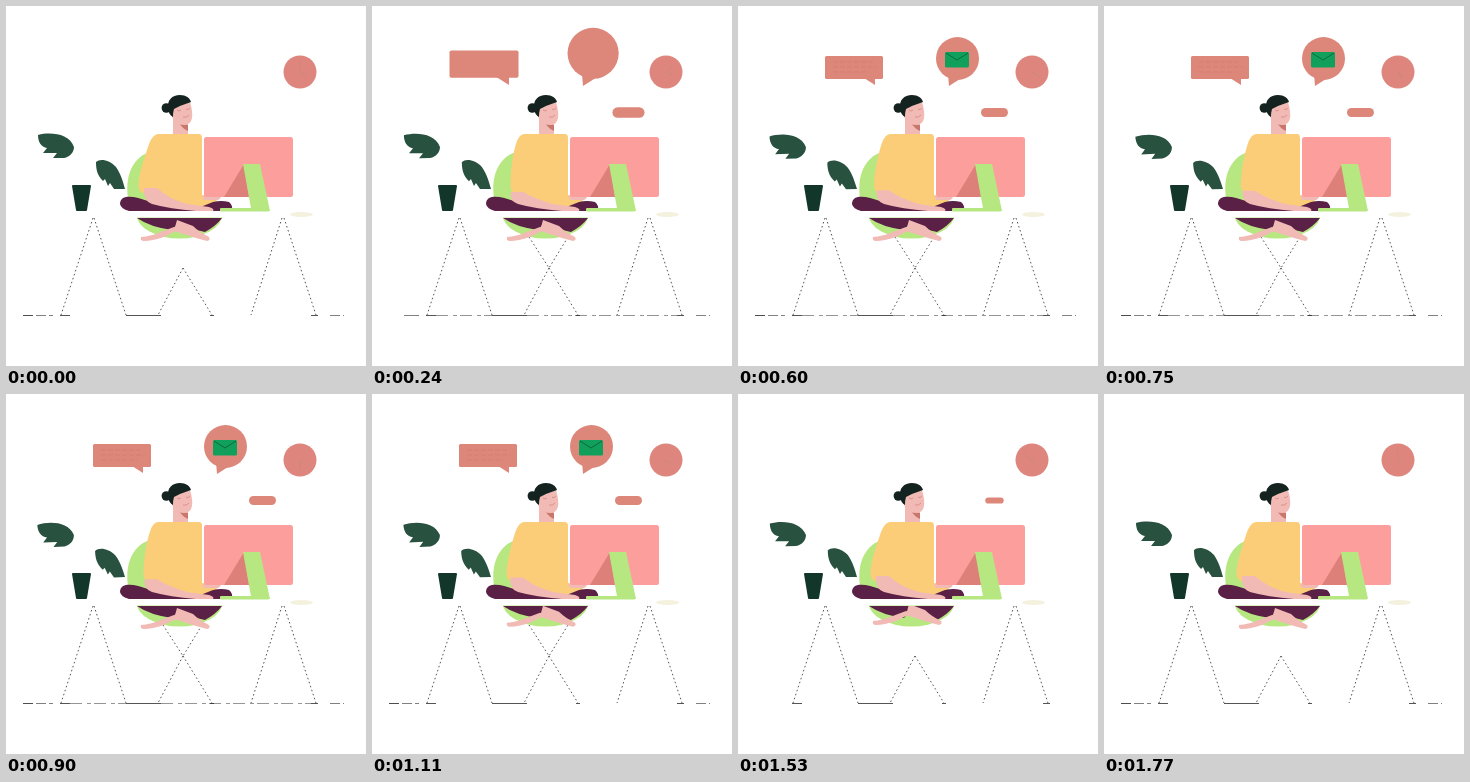
Write an HTML page with a canvas that moves like this. It is 360 px wide and 360 px high and loops after 1800 ms.

```html
<!DOCTYPE html>
<html lang="en">
<head>
<meta charset="utf-8">
<title>Working from home</title>
<style>
html, body { margin: 0; width: 100%; height: 100%; overflow: hidden; background: #fff; }
canvas { display: block; width: 360px; height: 360px; }
</style>
</head>
<body>
<canvas id="stage" width="360" height="360"></canvas>
<script>
const LOOP = 1800, STEP = 30;
const canvas = document.getElementById('stage');
const ctx = canvas.getContext('2d');
const dpr = window.devicePixelRatio || 1;
canvas.width = canvas.height = 360 * dpr;

const C = {
  bubble: '#dd877b', clock: '#de857e', screen: '#fc9f9c', shade: '#dd8079', lime: '#b7e781',
  shirt: '#fbcd78', skin: '#f2bab4', hair: '#14231f', legs: '#5a2045',
  leaf: '#29513f', pot: '#12372a', line: '#2a2a2a', mouse: '#f4f1df', mail: '#10a05c'
};

const clamp = x => Math.min(1, Math.max(0, x));
const ease = x => x * x * (3 - 2 * x);
const span = (t, a, b) => ease(clamp((t - a) / (b - a)));

// Eased interpolation through [time, value] pairs
function track(t, keys) {
  for (let i = 1; i < keys.length; i++) {
    const [a, u] = keys[i - 1], [b, v] = keys[i];
    if (t <= b) return u + (v - u) * span(t, a, b);
  }
  return keys[keys.length - 1][1];
}

function fill(d, color) {
  ctx.fillStyle = color;
  ctx.fill(new Path2D(d));
}

function stroke(d, color, width, dash = []) {
  ctx.strokeStyle = color;
  ctx.lineWidth = width;
  ctx.setLineDash(dash);
  ctx.stroke(new Path2D(d));
  ctx.setLineDash([]);
}

function box(x, y, w, h, r, color) {
  ctx.fillStyle = color;
  ctx.beginPath();
  ctx.roundRect(x, y, w, h, r);
  ctx.fill();
}

function oval(x, y, rx, ry, color) {
  ctx.fillStyle = color;
  ctx.beginPath();
  ctx.ellipse(x, y, rx, ry, 0, 0, 2 * Math.PI);
  ctx.fill();
}

// Draw with scale and rotation around a pivot
function around(x, y, scale, deg, draw) {
  if (scale <= 0.01) return;
  ctx.save();
  ctx.translate(x, y);
  ctx.rotate(deg * Math.PI / 180);
  ctx.scale(scale, scale);
  ctx.translate(-x, -y);
  draw();
  ctx.restore();
}

// Pop in past full size, settle, then shrink away
const pop = (t, out) => track(t, [[60, 0], [240, 1.19], [390, 1], [out, 1], [out + 240, 0]]);

function drawFloor(t) {
  const still = t > 1200 && t < 1560;
  const thin = [1.6, 2.6];
  stroke('M87 212L55 309M88 212L120 309M276 212L245 309M278 212L310 309', C.line, 0.8, thin);
  stroke('M177 262L152 309M177 262L206 309', C.line, 0.8, thin);
  if (t > 90 && t < 1440) stroke('M157 231L177 262L196 231', C.line, 0.8, thin);
  stroke('M54 309.5H64M120 309.5H155M204 309.5H208M305 309.5H312', C.line, 0.8);
  if (!still) {
    const left = t > 120 && t < 400 ? 42 : 17;
    stroke(`M${left} 309.5H30M${left} 309.5H47M324 309.5H338`, C.line, 0.6, [10, 3]);
  }
  if (t > 120 && t < 1110) stroke('M64 309.5H120M155 309.5H305', C.line, 0.5, [12, 5, 4, 3]);
}

function drawPlant(t) {
  const sway = (1 - Math.cos(2 * Math.PI * t / LOOP)) / 2;
  around(68, 143, 1, -3 * sway, () => {
    fill('M32 129C44 126 63 127 68 141C68 146 64 151 58 152L47 152L51 147L37 147L41 142C35 141 32 136 32 129Z', C.leaf);
  });
  around(119, 183, 1, -2 * sway, () => {
    fill('M90 156C94 152 104 154 110 161C115 168 117 176 119 183H108L104 177L102 180L99 173L97 175C91 169 90 163 90 156Z', C.leaf);
  });
  fill('M66 180Q66 179 67 179H84Q85 179 85 180L81 204Q81 205 80 205H71Q70 205 70 204Z', C.pot);
}

function drawChair() {
  fill('M122 192C118 166 130 146 151 145H180V200H124Z', C.lime);
  ctx.save();
  ctx.beginPath();
  ctx.rect(110, 211, 120, 30);
  ctx.clip();
  oval(173.5, 208, 43, 24.5, C.lime);
  ctx.restore();
}

function drawHead() {
  fill('M167 112H182V129H167Z', C.skin);
  fill('M173 117L182 119V125Q176 122 173 117Z', '#c9766d');
  fill('M164 104L184 96Q187 106 186 112Q185 118 179 119Q170 119 167 113Z', C.skin);
  oval(160.3, 102, 4.7, 4.8, C.hair);
  fill('M162 103C161 94 166 89 174 89C180 89 184 92 185 96L174 100L168 103Q167 106 167 111Q163 109 162 103Z', C.hair);
  stroke('M171 104Q173 106 175 104M180 103Q182 105 184 102M177 111Q181 112 183 109', '#c9766d', 0.6);
}

function drawPerson(t) {
  const e = track(t, [[0, 132.5], [240, 138.5], [600, 136], [900, 137.5], [1290, 132.3], [1800, 132.5]]);
  const k = (e - 132.5) / 6;
  const lift = track(t, [[0, 0], [900, 0], [1290, -4], [1530, -4], [1770, 0]]);

  // Crossed legs below the desk
  fill('M131 212H216Q210 220 199 226L186 223L172 217L166 224Q144 221 131 212Z', C.legs);
  ctx.save();
  ctx.beginPath();
  ctx.rect(120, 212, 100, 40);
  ctx.clip();
  ctx.translate(0, lift);
  fill('M171 214L187 220Q193 226 203 231Q205 234 201 235L190 232L168 225Z', C.skin);
  fill('M168 221L174 223L158 231Q146 235 138 235Q134 235 135 231Q145 230 152 227Z', C.skin);
  ctx.restore();

  drawHead();
  fill(`M152 128H193Q196 128 196 132V189L213 191L207 200H165L${e + 8} 187Q${e} 188 ${e} 180C${e} 168 ${139 + k} 150 ${143 + k} 138Q147 128 152 128Z`, C.shirt);
  fill('M196 190H214Q216 192 212 194H198Z', C.skin);

  // Legs above the desk
  fill('M117 192C123 189 133 192 142 195C157 201 180 203 192 202L207 196Q215 194 223 196Q227 199 226 205H123Q115 203 114 198Q114 194 117 192Z', C.legs);
  const y = 182 + 4 * k;
  fill(`M${138 + k} ${y}L151 ${y}Q163 193 181 198L203 201Q209 203 207 205H190Q164 203 146 198Q137 195 ${138 + k} ${y}Z`, C.skin);
}

function drawDesk() {
  box(198, 131, 89, 60, 2.5, C.screen);
  fill('M238 158L218 191H243Z', C.shade);
  fill('M237 158H254L264 205H245.5Z', C.lime);
  box(214, 202, 49, 4, 1, C.lime);
  box(110, 205.5, 170, 6, 0, '#fff');
  oval(295.5, 208.5, 11.5, 2.6, C.mouse);
}

function drawTextBubble(t) {
  box(87, 50, 58, 23, 1.5, C.bubble);
  fill('M126 72H137V79Z', C.bubble);
  const w = span(t, 300, 570);
  if (w > 0) {
    [[56, 42], [61, 44], [66, 36]].forEach(([y, len]) =>
      stroke(`M95 ${y}h${len * w}`, '#cb7c70', 0.7, [5, 2]));
  }
}

function drawMailBubble(t) {
  oval(219.5, 52.5, 21.5, 21.5, C.bubble);
  fill('M210 68L222 73L211 80Z', C.bubble);
  around(219, 53.5, span(t, 300, 480) - span(t, 1110, 1230), 0, () => {
    box(207, 46, 24, 15.5, 1.5, C.mail);
    stroke('M208 47L219 54L230 47', '#0a5b38', 0.8);
  });
}

function drawClock(t) {
  oval(294, 66, 16.5, 16.5, C.clock);
  const a = 2 * Math.PI * t / LOOP;
  const hand = (ang, r) => `M294 66l${r * Math.sin(ang)} ${-r * Math.cos(ang)}`;
  stroke(hand(a, 10) + hand(a / 12 + 2, 7), '#c98a80', 0.9);
}

function draw(t) {
  ctx.setTransform(dpr, 0, 0, dpr, 0, 0);
  ctx.fillStyle = '#fff';
  ctx.fillRect(0, 0, 360, 360);
  drawFloor(t);
  drawPlant(t);
  drawChair();
  drawPerson(t);
  drawDesk();
  const size = pop(t, 1150), turn = 95 * Math.max(0, 1 - size);
  around(137, 79, size, turn, () => drawTextBubble(t));
  around(211, 80, size, turn, () => drawMailBubble(t));
  around(256.5, 106.5, pop(t, 1440), 0, () => box(243, 102, 27, 9, 4.5, C.bubble));
  drawClock(t);
}

const start = performance.now();
function tick() {
  const t = (performance.now() - start) % LOOP;
  draw(Math.floor(t / STEP) * STEP);
  requestAnimationFrame(tick);
}
tick();
</script>
</body>
</html>
```
